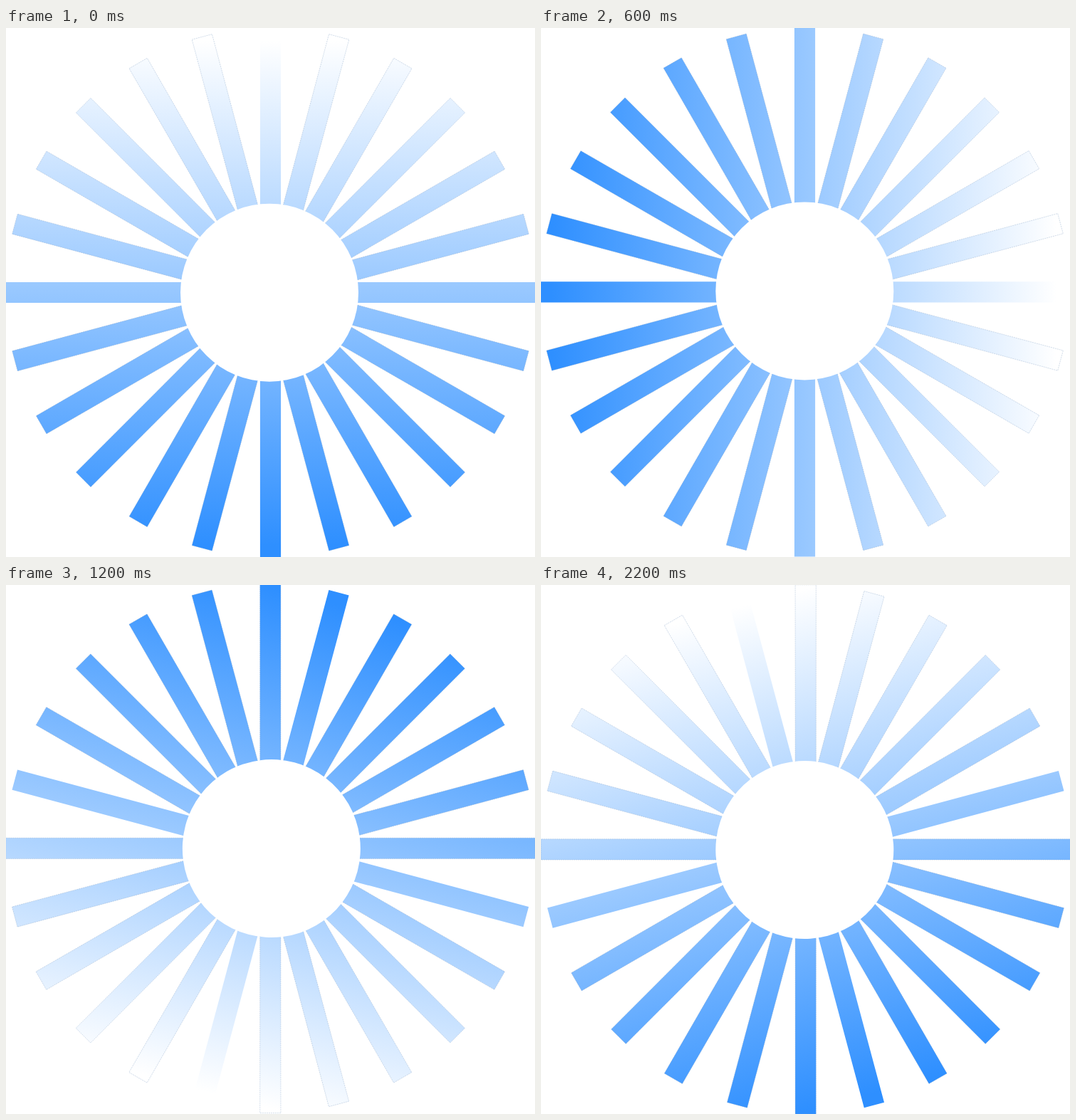
An HTML page that plays this animation: 743 px wide and 743 px high, repeating every 2300 ms.

```html
<!DOCTYPE html>
<html lang="en">
<head>
<meta charset="utf-8">
<title>Sunburst loader</title>
<style>
  html, body { margin: 0; width: 100%; height: 100%; overflow: hidden; background: #fff; }
  svg { display: block; width: 100%; height: 100%; }
</style>
</head>
<body>
<svg viewBox="0 0 743 743">
  <defs>
    <linearGradient id="fade" gradientUnits="userSpaceOnUse" x1="0" y1="18" x2="0" y2="727">
      <stop offset="0" stop-color="#fff"/>
      <stop offset="1" stop-color="#2e8fff"/>
    </linearGradient>
    <clipPath id="rays"></clipPath>
  </defs>
  <g id="wheel">
    <rect x="-10" y="-10" width="763" height="763" fill="url(#fade)" clip-path="url(#rays)"/>
    <g id="edges" fill="none" stroke="#8ba6c8" stroke-opacity=".45" stroke-width=".8" stroke-dasharray="2 1"></g>
    <circle cx="370" cy="371.7" r="125" fill="#fff"/>
  </g>
</svg>
<script>
  const RAYS = 24, STEP = 100, LOOP = 2300, TURN = 360 / RAYS;
  const CENTER = 371.5, RADIUS = 371.7, WIDTH = 29.2;
  const wheel = document.getElementById('wheel');

  function addRay(parent, i) {
    const ray = document.createElementNS('http://www.w3.org/2000/svg', 'rect');
    const attrs = {
      x: CENTER - WIDTH / 2, y: CENTER - RADIUS, width: WIDTH, height: RADIUS - 110,
      transform: `rotate(${i * TURN} ${CENTER} ${CENTER})`
    };
    for (const key in attrs) ray.setAttribute(key, attrs[key]);
    parent.append(ray);
  }

  for (let i = 0; i < RAYS; i++) {
    addRay(document.getElementById('rays'), i);
    // The four axis rays have no outline.
    if (i % 6) addRay(document.getElementById('edges'), i);
  }

  function draw() {
    const step = Math.floor(performance.now() % LOOP / STEP);
    // One position is skipped halfway, so 23 steps cover the full turn.
    const angle = TURN * (step < 12 ? step : step + 1);
    wheel.setAttribute('transform', `rotate(${angle} 371.3 370.7)`);
    requestAnimationFrame(draw);
  }
  draw();
</script>
</body>
</html>
```
